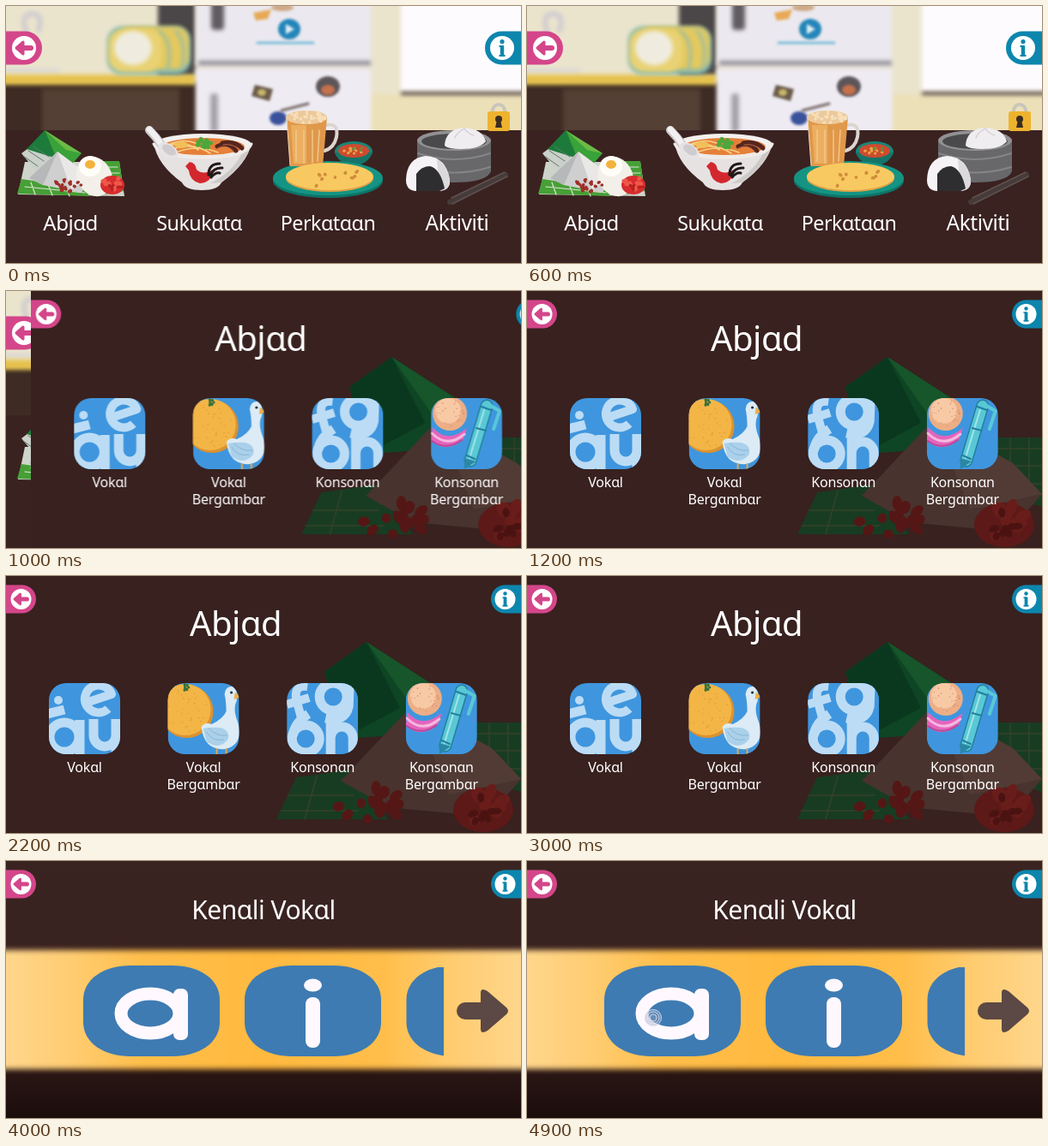
Write an HTML page with a canvas that moves like this. It is 600 by 300 pixels and loops after 5000 ms.

```html
<!DOCTYPE html>
<html lang="ms">
<head>
<meta charset="utf-8">
<title>Abjad</title>
<style>
html, body { margin: 0; width: 100%; height: 100%; overflow: hidden; background: #3a2221; }
canvas { display: block; width: 600px; height: 300px; }
</style>
</head>
<body>
<canvas id="stage" width="600" height="300"></canvas>
<script>
const W = 600, H = 300, LOOP = 5000, STEP = 100;
const stage = document.getElementById('stage').getContext('2d');
const FONT = '"Noto Sans", "DejaVu Sans", sans-serif';
let c;

function layer(draw) {
  const canvas = document.createElement('canvas');
  canvas.width = W;
  canvas.height = H;
  c = canvas.getContext('2d');
  c.lineCap = c.lineJoin = 'round';
  draw();
  return canvas;
}

function shape(color, d) {
  c.fillStyle = color;
  c.fill(new Path2D(d));
}
function line(color, width, d) {
  c.strokeStyle = color;
  c.lineWidth = width;
  c.stroke(new Path2D(d));
}
function oval(color, x, y, rx, ry = rx, turn = 0) {
  c.fillStyle = color;
  c.beginPath();
  c.ellipse(x, y, rx, ry, turn, 0, Math.PI * 2);
  c.fill();
}
function ring(color, width, x, y, rx, ry = rx) {
  c.strokeStyle = color;
  c.lineWidth = width;
  c.beginPath();
  c.ellipse(x, y, rx, ry, 0, 0, Math.PI * 2);
  c.stroke();
}
function box(color, x, y, w, h, r = 0) {
  c.fillStyle = color;
  c.beginPath();
  c.roundRect(x, y, w, h, r);
  c.fill();
}
function fade(x0, y0, x1, y1, ...stops) {
  const g = c.createLinearGradient(x0, y0, x1, y1);
  for (const [at, color] of stops) g.addColorStop(at, color);
  return g;
}
function clipped(d, draw) {
  c.save();
  c.clip(new Path2D(d));
  draw();
  c.restore();
}
function random(seed) {
  return () => (seed = seed * 16807 % 2147483647) / 2147483647;
}
// Dots scattered inside an ellipse.
function scatter(color, n, x, y, rx, ry, size, seed) {
  const rnd = random(seed);
  for (let i = 0; i < n; i++) {
    const a = rnd() * 6.283, r = Math.sqrt(rnd());
    oval(color, x + Math.cos(a) * r * rx, y + Math.sin(a) * r * ry, size * (0.7 + rnd() * 0.6), size * 0.8, a);
  }
}

// Single-storey "a", as in school handwriting.
const school = s => s.replace(/a/g, '\u0251');

function text(s, x, y, size, spacing = -0.5) {
  c.font = `500 ${size}px ${FONT}`;
  c.letterSpacing = spacing + 'px';
  c.textAlign = 'center';
  c.fillStyle = '#fff';
  c.fillText(school(s), x, y);
}

function buttons(y, w, h, r) {
  const pink = '#d4468a', blue = '#0d86ae', k = r / 14;
  const left = w / 2, right = W - w / 2 - 1;
  box(pink, -30, y - h / 2, 30 + w, h, h / 2);
  oval('#fff', left, y, r);
  box(blue, W - w, y - h / 2, w + 30, h, h / 2);
  oval('#fff', right, y, r);
  c.save();
  c.translate(left, y);
  c.scale(k, k);
  line(pink, 6, 'M8 0H-2');
  line(pink, 3, 'M-1-7L-9 0L-1 7Z');
  shape(pink, 'M-1-7L-9 0L-1 7Z');
  c.restore();
  c.save();
  c.translate(right, y);
  c.scale(k, k);
  oval(blue, 0, -7.5, 2.6);
  box(blue, -2.2, -3, 4.4, 13, 1);
  box(blue, -3.5, -3, 4, 2);
  box(blue, -3.5, 8, 7, 2);
  c.restore();
}

function kitchen() {
  c.filter = 'blur(2.5px)';
  box('#ebe4cd', -10, -10, 620, 170);
  line('#cfcbd0', 6, 'M24 31Q16 10 30 9Q44 10 38 28');
  line('#d6d4d6', 4, 'M0 75H60');
  box('#4b4748', 177, -10, 44, 92);
  box('#ece0b8', 425, 103, 185, 60);
  box('#3d2b24', -10, 88, 234, 65);
  box('#544034', 42, 97, 160, 60);
  box('#e6c24d', -10, 80, 232, 12);
  box('#ebe8ef', 221, -10, 204, 80);
  box('#eeebf2', 221, 73, 204, 80);
  box('#8d8a90', 224, 64, 201, 5);
  box('#605c61', 239, -10, 15, 38, 4);
  box('#a5a1a7', 238, 102, 9, 45, 4);
  box('#fdfbfe', 460, -10, 150, 110);
  box('#58463f', 460, 100, 150, 4);
  box('#83b9b2', 118, 24, 97, 56, 17);
  box('#e5c95e', 130, 24, 83, 50, 15);
  line('#8cbab0', 3, 'M178 29Q196 42 188 75M198 29Q211 44 205 72');
  box('#e9d274', 119, 27, 62, 50, 17);
  oval('#efecdf', 148, 49, 22, 20);
  c.filter = 'blur(1.5px)';
  shape('#e7a956', 'M288 8L309 4L305 15L291 17Z');
  oval('#cfa985', 322, 2, 13, 4);
  oval('#2386b9', 330, 27, 13, 12);
  shape('#e3eef4', 'M326 21L336 27L326 33Z');
  line('#7bbdd8', 3, 'M293 43H358');
  shape('#695a4b', 'M290 92L311 97L307 111L286 105Z');
  oval('#c8b76a', 298, 101, 5, 4);
  oval('#5c5559', 375, 94, 14, 12);
  oval('#c5714c', 375, 98, 8, 6);
  oval('#3a519b', 317, 131, 10, 8);
  line('#776865', 3, 'M321 122L352 114');
  c.filter = 'none';
}

function padlock() {
  line('#c9c6bb', 4, 'M567 125V122A7 7 0 0 1 581 122V125');
  box('#eeb32e', 561, 123, 26, 23, 3);
  oval('#3b2c22', 574, 132, 4);
  shape('#3b2c22', 'M572 133H576L578 142H570Z');
}

function nasi() {
  shape('#cfd4ca', 'M22 182H132L138 222L14 220Z');
  shape('#46a036', 'M97 181H132L137 216L104 222ZM18 202L92 213L97 222L13 219Z');
  line('#dfe5d4', 1.2, 'M104 188H130M105 195H132M106 202H134M22 211L92 218M29 206L34 220M49 208L54 221M70 211L74 222');
  shape('#cbd0ca', 'M18 172L38 157L56 176L35 193Z');
  shape('#1c7b3a', 'M45 145L24 167L59 178Z');
  shape('#39a239', 'M45 145L88 172L72 190L57 174Z');
  shape('#6dba47', 'M45 145L88 172L70 168Z');
  line('#5e796b', 1, 'M20 175L37 187M26 169L44 181M32 164L50 176');
  shape('#cfcfcf', 'M60 170L27 201L43 209L88 218L99 199Z');
  shape('#e9e8e6', 'M60 170L76 214L99 199Z');
  shape('#b7b8ba', 'M60 170L27 201L43 209Z');
  oval('#f3f0e9', 103, 199, 20, 24, -0.5);
  oval('#fffdf7', 98, 187, 13, 12);
  oval('#f3b23e', 98, 185, 6, 5);
  scatter('#9e3028', 22, 72, 209, 16, 8, 2.2, 7);
  oval('#d82c2e', 124, 209, 14, 11);
  scatter('#f0574a', 12, 124, 208, 12, 8, 3, 12);
  scatter('#b6221f', 8, 124, 211, 12, 7, 2, 34);
}

function noodles() {
  shape('#e6e2e1', 'M172 160Q176 185 205 206Q209 215 228 215Q247 215 251 206Q281 184 286 160Z');
  shape('#cfcaca', 'M251 206Q281 184 286 160L275 172Q264 194 238 207Z');
  oval('#f3f0ee', 229, 162, 57, 13);
  oval('#e5803a', 230, 164, 48, 10);
  line('#f7cf84', 1.6, 'M186 165Q206 155 224 168M190 169Q215 157 238 172M198 171Q222 161 247 171M189 162Q207 154 221 160');
  oval('#f2bf59', 204, 162, 8, 4);
  line('#56251e', 5, 'M246 164Q259 157 268 169M252 160Q266 157 275 166');
  line('#bb6a47', 1, 'M246 166Q258 160 266 171M253 162Q265 160 272 168');
  scatter('#4ba83c', 14, 231, 160, 8, 5, 3, 5);
  line('#efecea', 3, 'M172 161Q178 177 229 177Q281 177 286 161');
  line('#c8c5c7', 10, 'M167 145Q175 153 181 162');
  line('#f1eff0', 7, 'M167 144Q174 151 181 162');
  oval('#e6e3e5', 189, 169, 13, 8, 0.6);
  oval('#cfcccf', 190, 168, 9, 5, 0.6);
  shape('#d3272e', 'M209 187L214 182Q221 183 222 191Q230 198 241 191Q240 206 226 207Q214 204 213 192Z');
  line('#22191b', 3, 'M236 197Q236 184 249 184M238 198Q242 188 252 189M239 200Q244 194 249 195');
}

function teaAndRoti() {
  oval('#188678', 405, 170, 22, 12);
  shape('#167568', 'M383 171Q388 185 405 186Q422 185 427 171Z');
  oval('#cc4b30', 405, 169, 18, 8);
  scatter('#eba344', 9, 405, 169, 13, 5, 2, 8);
  scatter('#60913c', 4, 405, 169, 12, 5, 1.6, 19);
  oval('#0d7469', 375, 204, 64, 20);
  oval('#159483', 375, 201, 64, 20);
  line('#dcd5cf', 4, 'M373 139Q388 136 385 153Q382 166 371 169');
  shape('#e0984a', 'M327 130H374L369 187H331Z');
  shape('#ecae60', 'M332 139H350V184H335Z');
  line('#f3cc92', 1.3, 'M338 145V181M347 145V183M357 145V183M365 145L363 181');
  oval('#ecc99a', 350, 130, 24, 8);
  scatter('#f6dfba', 28, 350, 130, 22, 7, 2.1, 22);
  line('#f1dcb5', 1, 'M327 131L331 186');
  oval('#e0a246', 377, 201, 51, 16);
  oval('#f9c961', 377, 199, 51, 16);
  scatter('#cf8d3c', 9, 377, 200, 42, 11, 2.4, 61);
}

function dimSum() {
  shape('#68686b', 'M479 156H565V193Q560 206 521 206Q483 205 479 193Z');
  line('#858588', 2, 'M480 172Q522 186 564 172M480 188Q522 201 564 188');
  oval('#919194', 522, 157, 43, 12);
  oval('#4a4a4d', 522, 158, 38, 9);
  shape('#efedf0', 'M511 163Q512 144 533 142Q555 143 559 158Q552 167 530 167Q515 167 511 163Z');
  line('#cfcbd0', 1.2, 'M534 143Q525 148 523 154M534 143Q538 149 545 151');
  line('#463b39', 6, 'M517 229L582 197');
  line('#5f524f', 1.5, 'M519 224L581 194M520 231L584 199');
  shape('#f6f3f7', 'M466 203Q467 177 489 175Q513 176 517 203Q518 215 505 216H477Q466 215 466 203Z');
  shape('#dcd9dd', 'M502 179Q514 185 517 203Q518 215 505 216Z');
  shape('#2e2d30', 'M478 216V196Q484 187 494 187Q506 190 511 213L505 216Z');
}

function home() {
  kitchen();
  box('#3a2221', 0, 145, W, 155);
  padlock();
  nasi();
  noodles();
  teaAndRoti();
  dimSum();
  text('Abjad', 75, 262, 24);
  text('Sukukata', 225, 262, 23.3);
  text('Perkataan', 375, 262, 23.3);
  text('Aktiviti', 525.5, 262, 24.5);
  buttons(49, 42, 39, 14);
}

function menuBack() {
  box('#38211f', 0, 0, W, H);
  shape('#183c22', 'M520 171H600V252L545 235ZM338 235L402 226L445 284H315Z');
  line('#34422a', 1.5, 'M530 184H600M534 204H600M538 225H600M563 172V246M585 172V250M328 256H405M320 274H410M362 234L348 284');
  shape('#0e4524', 'M371 112L420 77L522 143L470 185L392 190Z');
  shape('#16562a', 'M420 77L522 143L472 151Z');
  shape('#0a381f', 'M371 112L420 77L459 154L392 190Z');
  shape('#48332e', 'M474 150L390 239L445 270L562 281L600 237L566 201Z');
  shape('#523b35', 'M474 150L516 255L600 237L566 201Z');
  scatter('#551715', 15, 430, 266, 44, 20, 7, 17);
  oval('#5c1917', 556, 273, 35, 26);
  scatter('#691d1a', 10, 556, 270, 27, 20, 8, 41);
  scatter('#4a1312', 8, 556, 275, 29, 19, 5, 92);
}

function tile(x, draw) {
  c.save();
  c.translate(x, 125);
  c.beginPath();
  c.roundRect(0, 0, 83, 83, 20);
  c.clip();
  box('#3f96de', 0, 0, 83, 83);
  draw();
  c.restore();
}

const PALE = '#bcdcf5';

function vowels() {
  c.lineCap = 'butt';
  oval(PALE, 11, 20, 5);
  line(PALE, 11, 'M-2 36L18 31');
  line(PALE, 10, 'M43 23L73 13A16 16 0 1 0 69 30');
  ring(PALE, 11, 18, 63, 17);
  line(PALE, 11, 'M36 43V83');
  line(PALE, 11, 'M52 42V61A13 13 0 0 0 78 61V42M78 55V82');
}

function orangeAndGoose() {
  oval('#dc922e', 22, 33, 31);
  oval('#f3b546', 20, 31, 30);
  scatter('#df9937', 35, 20, 32, 26, 26, 0.8, 3);
  scatter('#36723c', 8, 20, 5, 5, 3, 2, 28);
  shape('#dcebf5', 'M66 13Q67 3 76 4Q82 8 80 21Q75 30 82 47Q88 72 67 77Q42 79 39 51Q43 45 51 48Q64 42 68 33Q68 21 66 13Z');
  shape('#abd0ea', 'M41 53Q50 51 61 52Q73 55 70 66Q59 79 45 68Z');
  line('#87b6d6', 1, 'M45 57Q52 69 65 66M48 53Q57 63 69 61');
  shape('#edae46', 'M78 11L86 16L77 19Z');
  oval('#28323a', 74, 11, 1.6);
  line('#e5a848', 2, 'M57 77V83M68 77V83');
}

function consonants() {
  c.lineCap = 'butt';
  line(PALE, 10, 'M18 45L11 19Q8 2 24 4M0 25L26 17');
  ring(PALE, 11, 54, 16, 16);
  line(PALE, 11, 'M73-2L72 27Q68 46 45 41');
  ring(PALE, 11, 22, 65, 16);
  line(PALE, 11, 'M7 62Q8 47 25 36');
  line(PALE, 11, 'M51 86V44M51 64A13 13 0 0 1 77 64V86');
}

function ballAndPen() {
  shape('#e564bd', 'M2 34Q18 54 42 35L37 49Q17 65 0 50Z');
  line('#f5b8de', 3, 'M1 41Q19 59 39 42');
  line('#b94795', 2, 'M1 50Q18 62 36 49');
  oval('#edae86', 22, 18, 20);
  oval('#f7c9a4', 20, 15, 15);
  scatter('#d18c71', 25, 22, 18, 17, 17, 0.8, 83);
  line('#247f9d', 15, 'M65 9L46 73');
  line('#58c8d6', 12, 'M65 9L46 73');
  line('#a4e3e6', 2, 'M62 14L45 70');
  line('#247f9d', 2, 'M59 10L70 14M53 35L64 38M42 67L51 71');
  line('#58c8d6', 4, 'M68 8L80 15L73 36');
  shape('#2b86a4', 'M39 70L52 74L39 83Z');
}

function menu() {
  const tiles = [
    [vowels, 'Vokal'],
    [orangeAndGoose, 'Vokal', 'Bergambar'],
    [consonants, 'Konsonan'],
    [ballAndPen, 'Konsonan', 'Bergambar']
  ];
  menuBack();
  tiles.forEach(([draw, ...label], i) => {
    const x = 50 + i * 138.6;
    tile(x, draw);
    label.forEach((s, row) => text(s, x + 41.5, 229 + row * 20, 16, -0.2));
  });
  text('Abjad', 267.5, 70, 40);
  buttons(27, 35, 33, 12);
}

function card(x) {
  shape('#3e7bb2', `M${x} 162C${x} 137 ${x + 25} 122 ${x + 55} 122H${x + 104}C${x + 134} 122 ${x + 159} 137 ${x + 159} 162V188C${x + 159} 213 ${x + 134} 228 ${x + 104} 228H${x + 55}C${x + 25} 228 ${x} 213 ${x} 188Z`);
}

function lesson() {
  box(fade(0, 0, 0, H, [0, '#3a2421'], [0.4, '#38211f'], [0.8, '#2b1715'], [1, '#1b0d0c']), 0, 0, W, H);
  text('Kenali Vokal', 300, 68, 30);
  buttons(27, 35, 33, 12);
  c.filter = 'blur(3px)';
  box(fade(0, 0, W, 0, [0, '#ffd68c'], [0.12, '#ffcd73'], [0.27, '#ffbe4a'], [0.5, '#ffb93f'],
    [0.73, '#ffbe4a'], [0.88, '#ffcd73'], [1, '#ffd68c']), -12, 104, W + 24, 139);
  c.filter = 'none';
  card(90);
  card(278);
  clipped('M460 124H510V228H460Z', () => card(466.5));
  ring('#fff8ff', 15, 168, 178, 34, 23);
  box('#fff8ff', 195, 149, 17, 60, 7);
  oval('#fff8ff', 357.5, 145, 10.5, 7.5);
  box('#fff8ff', 349, 159, 17, 59, 8);
  line('#5c4844', 20, 'M535 175H562');
  shape('#5c4844', 'M553 154Q553 147 561 152L583 171Q587 175 583 179L561 198Q553 203 553 196Z');
}

function touch(x, y, strength) {
  c = stage;
  c.save();
  c.globalAlpha = strength;
  oval('rgba(150,165,195,.45)', x, y, 10);
  for (const r of [4, 7, 9.5]) ring('rgba(235,235,245,.75)', 1, x, y, r);
  c.restore();
}

const homePage = layer(home), menuPage = layer(menu), lessonPage = layer(lesson);

// A page glides in from the right while it fades in.
function enter(page, age) {
  const left = 1 - Math.min(1, age / 200);
  stage.globalAlpha = Math.min(1, age / 120) ** 1.3;
  stage.drawImage(page, 183 * left * left, 0);
  stage.globalAlpha = 1;
}

function render(t) {
  stage.drawImage(t < 1200 ? homePage : menuPage, 0, 0);
  if (t === 800 || t === 900) touch(85, 221, 0.35);
  if (t >= 900 && t < 1200) enter(menuPage, t - 880);
  if (t >= 3900) enter(lessonPage, t - 3780);
  if (t >= 4800) touch(147, 183, t < 4900 ? 0.5 : 1);
}

const start = performance.now();
function tick() {
  const t = (performance.now() - start) % LOOP;
  render(Math.floor(t / STEP) * STEP);
  requestAnimationFrame(tick);
}
tick();
</script>
</body>
</html>
```
